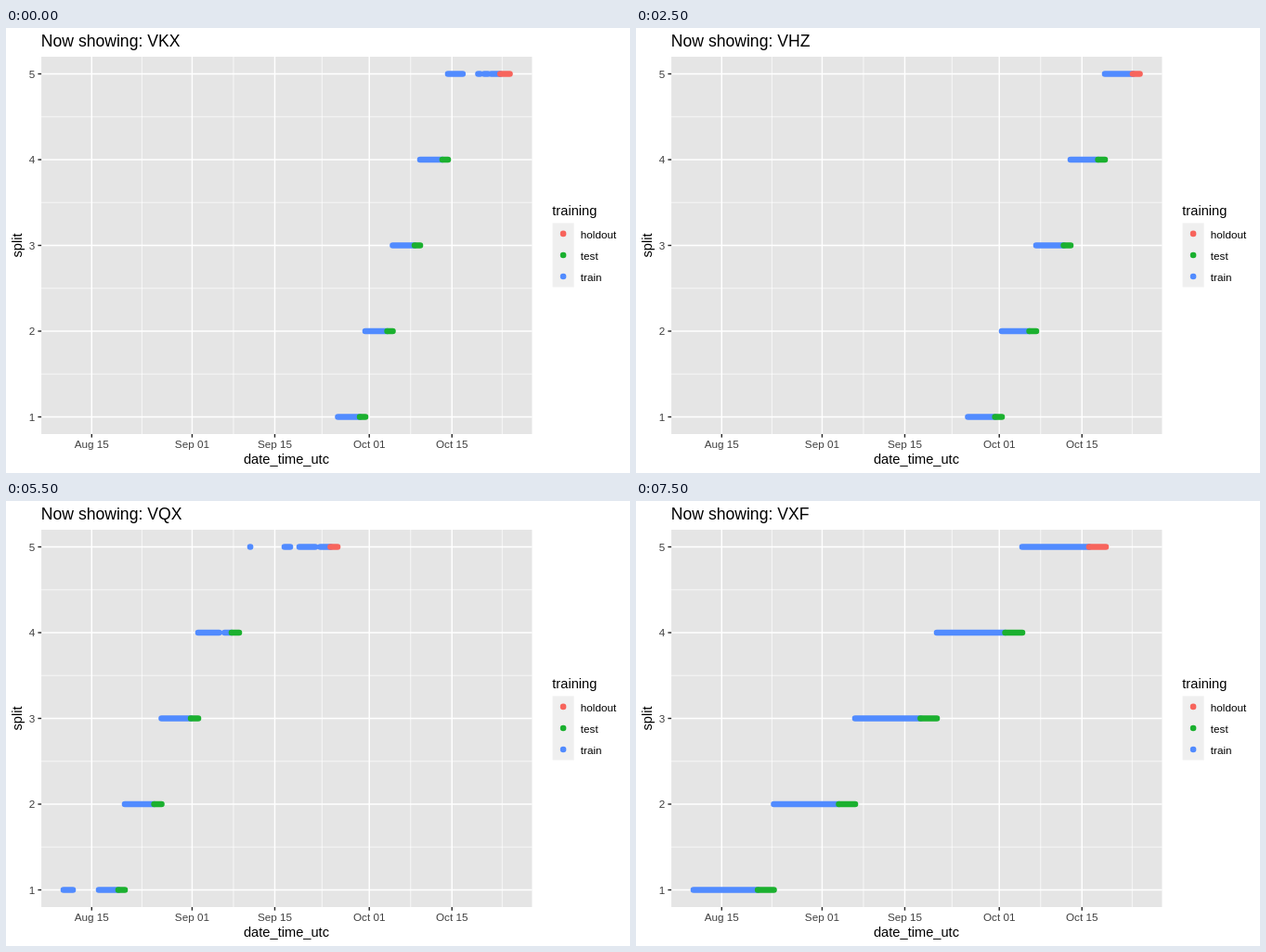
These frames come from a looping animation (672x480 px, 8 s). An HTML page:

```html
<!DOCTYPE html>
<html lang="en">
<head>
<meta charset="utf-8">
<title>Splits over time</title>
<style>
  html, body { margin: 0; width: 100%; height: 100%; overflow: hidden; background: #fff; }
  svg { display: block; width: 672px; height: 480px; }
  text { font-family: "Liberation Sans", Arial, sans-serif; font-size: 14.67px; fill: #000; }
  .title { font-size: 17.6px; }
  .small { font-size: 11.73px; }
  .tick { fill: #404040; }
  .dots { fill: none; stroke-width: 6.6; stroke-linecap: round; }
</style>
</head>
<body>
<svg id="stage" viewBox="0 0 672 480"></svg>
<script>
const stage = document.getElementById('stage');
const COLORS = { holdout: '#f7645c', test: '#1bb02f', train: '#518bff' };
const PANEL = { left: 38.1, right: 566.5, top: 31, bottom: 438 };

const add = (tag, attrs, text = '') => {
  const node = document.createElementNS('http://www.w3.org/2000/svg', tag);
  for (const key in attrs) node.setAttribute(key, attrs[key]);
  node.textContent = text;
  return stage.appendChild(node);
};
const line = (x1, y1, x2, y2, stroke, width) =>
  add('line', { x1, y1, x2, y2, stroke, 'stroke-width': width });
const vertical = (x, width) => line(x, PANEL.top, x, PANEL.bottom, '#fff', width);
const horizontal = (y, width) => line(PANEL.left, y, PANEL.right, y, '#fff', width);
const dayX = day => 92.3 + day * 6.36;          // days since Aug 15
const rowY = row => 512 - row * 92.5;

const DATES = [['Aug 15', 0], ['Sep 01', 17], ['Sep 15', 31], ['Oct 01', 47], ['Oct 15', 61]];
const ROWS = [1, 2, 3, 4, 5];

function drawChart() {
  const { left, right, top, bottom } = PANEL;
  add('rect', { x: left, y: top, width: right - left, height: bottom - top, fill: '#e5e5e5' });
  [8.5, 24, 39, 54, 69.5].forEach(day => vertical(dayX(day), 0.71));
  ROWS.slice(1).forEach(row => horizontal(rowY(row - 0.5), 0.71));

  for (const [label, day] of DATES) {
    const x = dayX(day);
    vertical(x, 1.42);
    line(x, bottom, x, bottom + 3.67, '#272727', 1.42);
    add('text', { x, y: 453.2, class: 'small tick', 'text-anchor': 'middle' }, label);
  }
  for (const row of ROWS) {
    const y = rowY(row);
    horizontal(y, 1.42);
    line(left - 3.67, y, left, y, '#272727', 1.42);
    add('text', { x: 31.2, y: y + 4.2, class: 'small tick', 'text-anchor': 'end' }, row);
  }
  add('text', { x: 302, y: 469.8, 'text-anchor': 'middle' }, 'date_time_utc');
  add('text', { transform: 'translate(17.3 234.5) rotate(-90)', 'text-anchor': 'middle' }, 'split');

  add('text', { x: 588.3, y: 202.3 }, 'training');
  add('rect', { x: 588.6, y: 210.4, width: 23.04, height: 69.1, fill: '#efefef' });
  Object.keys(COLORS).forEach((name, i) => {
    const cy = 221.9 + i * 23.04;
    add('circle', { cx: 600.1, cy, r: 3.3, fill: COLORS[name] });
    add('text', { x: 618.8, y: cy + 4.6, class: 'small' }, name);
  });
}

const NAMES = ['VKX', 'VHXZ', 'VHZ', 'VUQ', 'VUKH', 'VQX', 'VQQ', 'VXF'];

// edges: bounds of the five splits; cuts: where testing starts if not at 80 %; gaps: no readings
const VIEWS = [
  { edges: [357.5, 387, 416.5, 446, 476, 542.5], cuts: { 5: 532.3 },
    gaps: [[491.8, 508.5], [510.5, 515], [519, 522.5]] },
  { edges: [62, 144, 219.7, 396, 469, 542.5], cuts: { 1: 129, 3: 381 },
    gaps: [[91.5, 96], [101, 107], [151.5, 156], [254, 357.5]] },
  { edges: [62, 137, 197, 254, 420, 542.5], cuts: { 1: 125, 4: 408, 5: 531 },
    gaps: [[80.3, 88], [254, 357.5], [420, 478]] },
  { edges: [357.5, 394, 431, 468, 505, 542.5] },
  { edges: [178.5, 215, 251, 388, 424, 461], cuts: { 3: 380 }, gaps: [[254, 357.5]] },
  { edges: [254.5, 283.7, 313, 343, 448, 537.3], cuts: { 4: 442.3, 5: 472 },
    gaps: [[357, 433], [477.7, 537.3]] },
  { edges: [62, 128, 167.5, 207, 251, 357], cuts: { 1: 121, 4: 243, 5: 349.5 },
    gaps: [[72, 100], [229.5, 235.5], [251, 263], [263.1, 300], [306, 316], [333, 338.5]] },
  { edges: [62, 95, 133.5, 191.3, 230.8, 432.7], cuts: { 2: 121, 3: 165, 4: 224, 5: 359.5 },
    gaps: [[126.5, 132.7], [134, 139], [165.5, 169], [177, 182.7], [183, 190.5], [192.2, 199],
           [254, 357], [357.5, 360.3], [360.4, 376], [376.1, 393.6], [394.7, 427]] },
  { edges: [62, 148.5, 236, 324, 416, 506] },
];

function stretch(from, to, y, gaps) {
  let path = '';
  const mark = (a, b) => { path += `M${a} ${y}H${b}`; };
  for (const [start, end] of gaps) {
    if (end <= from || start >= to) continue;
    if (start > from) mark(from, start);
    from = end;
  }
  if (from <= to) mark(from, to);
  return path;
}

function buildPaths({ edges, cuts = {}, gaps = [] }) {
  const paths = { train: '', test: '', holdout: '' };
  for (const row of ROWS) {
    const [from, to] = [edges[row - 1], edges[row]];
    const cut = cuts[row] ?? from + 0.8 * (to - from);
    paths.train += stretch(from, cut, rowY(row), gaps);
    paths[row === 5 ? 'holdout' : 'test'] += stretch(cut, to, rowY(row), gaps);
  }
  return paths;
}

drawChart();
const title = add('text', { x: 37.8, y: 20, class: 'title' });
const series = {};
for (const name of ['train', 'test', 'holdout'])
  series[name] = add('path', { class: 'dots', stroke: COLORS[name] });
const viewPaths = VIEWS.map(buildPaths);

// The points run half a second ahead of the title.
function render(time) {
  const seconds = (time % 8000) / 1000;
  title.textContent = 'Now showing: ' + NAMES[Math.floor(seconds)];
  const paths = viewPaths[Math.floor(seconds + 0.5)];
  for (const name in series) series[name].setAttribute('d', paths[name]);
}

const began = performance.now();
function tick() {
  render(performance.now() - began);
  requestAnimationFrame(tick);
}
tick();
</script>
</body>
</html>
```
